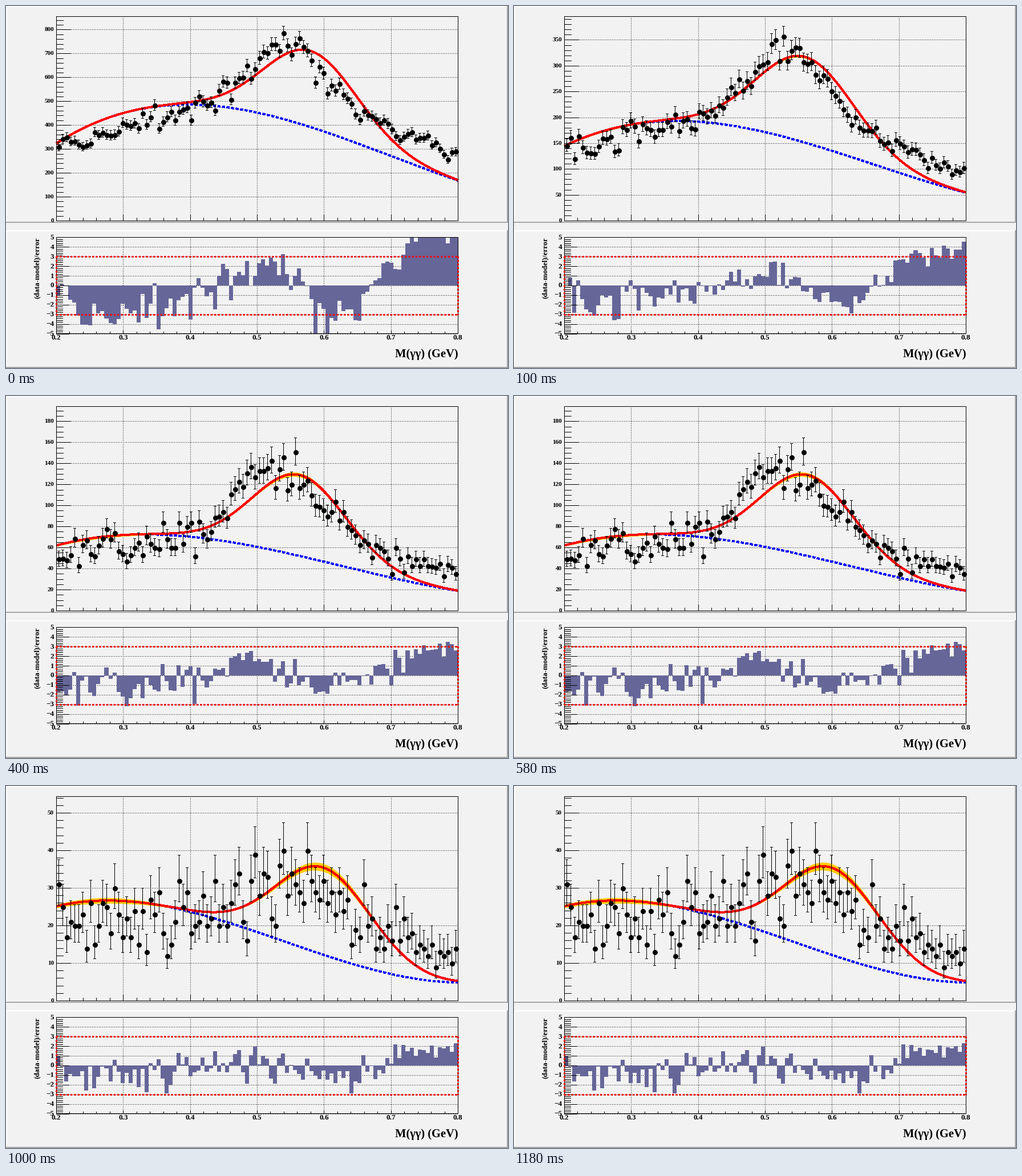
A matplotlib script for the animation above (1300 ms loop, 880x636 px).

```python
import numpy as np
import matplotlib.pyplot as plt
from matplotlib.animation import FuncAnimation
from matplotlib.patches import Rectangle

plt.rcParams["path.snap"] = False

W, H, DPI = 880, 636, 100
PX = 72 / DPI
LEFT, RIGHT = 88, 792
TOP, BASE = 18, 377            # fit panel
PTOP, PBASE = 406, 575         # pull panel
PZERO = 491
PUNIT = (PBASE - PTOP) / 10
BINS = 100
FIRST, LONG = 1, 3             # steps of 100 ms: first scene, later scenes
STEPS = 13

# axis maximum, label step, minor divisions, band half width in pixels,
# misfit, background at 0.2 / 0.4 / 0.6 / 0.8, gaussian height, mean, sigma
FITS = [
    (856, 100, 5, 0.0, 1.0, (325, 487, 374, 169), 319, 0.580, 0.069),
    (395.7, 50, 5, 2.6, 0.65, (145, 192, 135.5, 54.5), 166, 0.560, 0.0725),
    (194.3, 20, 4, 3.8, 0.5, (62.2, 70.5, 46.7, 19), 77, 0.563, 0.0695),
    (80.2, 10, 5, 7.0, 0.45, (28.2, 29.4, 16.9, 7.3), 32, 0.579, 0.0705),
    (54.4, 10, 5, 7.0, 0.4, (25.2, 23.7, 12.2, 4.9), 23.2, 0.599, 0.071),
]

# how far the data stray from the model, in standard errors
TREND_M = [0.2, 0.24, 0.32, 0.42, 0.46, 0.54, 0.59, 0.64, 0.68, 0.72, 0.8]
TREND = [-0.5, -3, -2.3, -0.7, 1.4, 2.2, -2.5, -2.8, 1, 5, 8]

fig = plt.figure(figsize=(W / DPI, H / DPI), dpi=DPI, facecolor="#f2f2f2")
ax = fig.add_axes([0, 0, 1, 1])
ax.axis("off")


def xpix(m):
    return LEFT + (m - 0.2) / 0.6 * (RIGHT - LEFT)


def seg(x0, y0, x1, y1, width=1, color="black", z=6, **kw):
    """Horizontal or vertical line covering whole pixels, ends included."""
    x0, x1 = sorted(np.round([x0, x1]))
    y0, y1 = sorted(np.round([y0, y1]))
    if y0 == y1:
        x0, x1 = x0 - 0.5, x1 + 0.5
    else:
        y0, y1 = y0 - 0.5, y1 + 0.5
    return ax.plot([x0, x1], [y0, y1], lw=width * PX, color=color, zorder=z,
                   solid_capstyle="butt", **kw)[0]


def dots(x0, y0, x1, y1):
    return seg(x0, y0, x1, y1, z=1, ls=(0, (1, 2)))


def label(x, y, s, size, **kw):
    kw = {"ha": "right", "va": "center", **kw}
    return ax.text(x, y, s, fontsize=size * PX, family="Liberation Serif",
                   weight="bold", zorder=8, **kw)


def box(x0, y0, x1, y1, **kw):
    for line in [(x0, y0, x1, y0), (x0, y1, x1, y1),
                 (x0, y0, x0, y1), (x1, y0, x1, y1)]:
        seg(*line, **kw)


def bevel(y0, y1):
    for x, y, w, h, c in [(0, y0, W, 2, "white"), (0, y0, 2, y1 - y0, "white"),
                          (0, y1 - 2, W, 2, "#a6a6a6"),
                          (W - 2, y0, 2, y1 - y0, "#a6a6a6")]:
        ax.add_patch(Rectangle((x - 0.5, y - 0.5), w, h, color=c, lw=0,
                               zorder=0))


def draw_static():
    bevel(0, 381)
    bevel(394, H)
    box(LEFT, TOP, RIGHT, BASE)
    box(LEFT, PTOP, RIGHT, PBASE)
    for k in range(31):
        m = 0.2 + 0.02 * k
        x = xpix(m)
        major = k % 5 == 0
        seg(x, BASE, x, BASE - (10 if major else 5))
        seg(x, PBASE, x, PBASE - (5 if major else 3))
        if major:
            label(x - 0.5, 583, f"{m:.1f}", 13.3, ha="center")
            dots(x, TOP, x, BASE)
            dots(x, PTOP, x, PBASE)
    for k in range(-25, 26):
        y = PZERO - k / 5 * PUNIT
        major = k % 5 == 0
        seg(LEFT, y, LEFT + (22 if major else 11), y)
        if major:
            dots(LEFT, y, RIGHT, y)
            label(84, y, str(k // 5).replace("-", "\u2212"), 13.3)
    box(LEFT, PZERO - 3 * PUNIT, RIGHT, PZERO + 3 * PUNIT, width=3,
        color="red", z=7, ls=(0, (1.1, 1)))
    label(54, 406, "(data-model)/error", 13.4, ha="center", va="top",
          rotation=90)
    label(792, 616, "M(\u03b3\u03b3) (GeV)", 20.5, va="baseline")


def draw_fit(k):
    ymax, step, minor, half, misfit, bg, height, mean, sigma = FITS[k]
    unit = (BASE - TOP) / ymax
    poly = np.polyfit([0.2, 0.4, 0.6, 0.8], bg, 3)

    def ypix(v):
        return BASE - v * unit

    def back(m):
        return np.polyval(poly, m)

    def model(m):
        return back(m) + height * np.exp(-((m - mean) / sigma) ** 2 / 2)

    art = []
    for j in range(int(ymax / step * minor) + 1):
        v = j * step / minor
        y = ypix(v)
        major = j % minor == 0
        art.append(seg(LEFT, y, LEFT + (25 if major else 12), y))
        if major:
            art += [label(83.5, y, f"{v:.0f}", 11.2), dots(LEFT, y, RIGHT, y)]

    m = np.linspace(0.2, 0.8, 241)
    x, y = xpix(m), ypix(model(m))
    art += ax.plot(x, ypix(back(m)), color="blue", lw=3 * PX, zorder=2,
                   ls=(0, (1.4, 1.1)), antialiased=False)
    spread = half * (0.7 * np.exp(-((m - 0.27) / 0.1) ** 2)
                     + np.exp(-((m - mean) / 0.1) ** 2))
    art.append(ax.fill_between(x, y - spread, y + spread, lw=0,
                               color="#ffcc00", zorder=3, antialiased=False))
    art += ax.plot(x, y, color="red", lw=3 * PX, zorder=4,
                   solid_capstyle="butt", antialiased=False)

    mid = 0.2 + 0.6 * (np.arange(BINS) + 0.5) / BINS
    expect = model(mid)
    stray = misfit * np.interp(mid, TREND_M, TREND)
    stray += np.random.default_rng(20 + k).normal(0, 1, BINS)
    n = np.maximum(np.round(expect + stray * np.sqrt(expect)), 5)

    up, down = np.sqrt(n + 0.75) + 1, np.sqrt(n - 0.25)
    cx = np.round(xpix(mid))
    hi, lo = np.round(ypix(n + up)), np.round(ypix(n - down))
    art.append(ax.vlines(cx, hi, lo, color="black", lw=PX, zorder=5))
    for cap in (hi, lo):
        art.append(ax.hlines(cap, cx - 2.5, cx + 2.5, color="black", lw=PX,
                             zorder=5))
    art += ax.plot(cx, np.round(ypix(n)), "o", color="black", ms=9 * PX,
                   mew=0, zorder=5, antialiased=False)

    pull = np.clip((n - expect) / np.where(n > expect, down, up), -5, 5)
    edges = np.round(np.linspace(LEFT, RIGHT, BINS + 1)) - 0.5
    art.append(ax.stairs(np.round(PZERO - pull * PUNIT) - 0.5, edges,
                         baseline=PZERO - 0.5, fill=True, color="#666699",
                         lw=0, zorder=2))
    return art


draw_static()
scenes = [draw_fit(k) for k in range(len(FITS))]
# whole numbers are pixel centres
ax.set_xlim(-0.5, W - 0.5)
ax.set_ylim(H - 0.5, -0.5)


def update(i):
    current = 0 if i < FIRST else 1 + (i - FIRST) // LONG
    for k, scene in enumerate(scenes):
        for a in scene:
            a.set_visible(k == current)
    return []


update(0)
anim = FuncAnimation(fig, update, frames=STEPS, interval=100, repeat=True,
                     repeat_delay=0, init_func=lambda: update(0))
plt.show()
```
